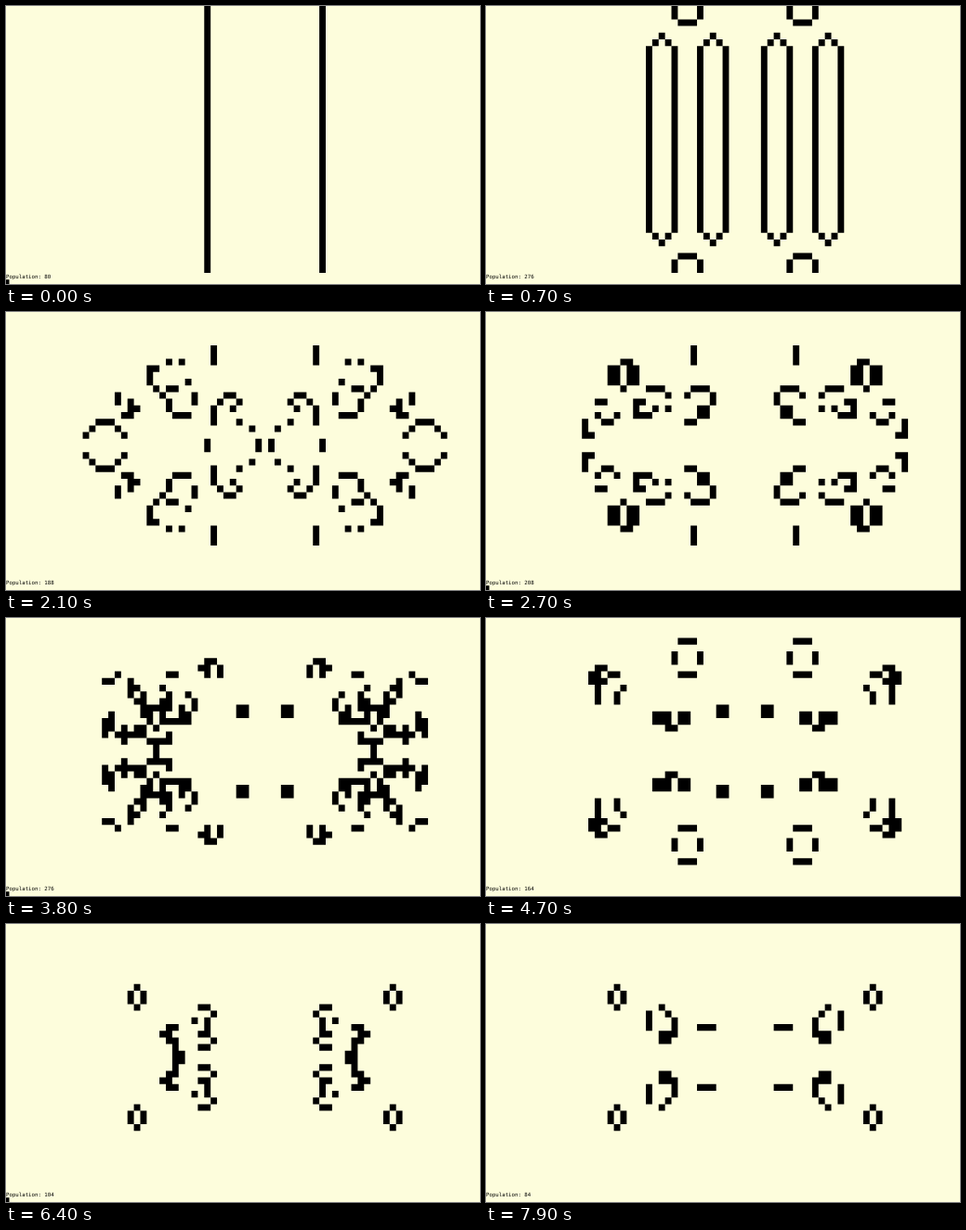
An HTML page with a canvas that plays this animation: 510 px wide and 300 px high, repeating every 8 s.

```html
<!DOCTYPE html>
<html lang="en">
<head>
<meta charset="utf-8">
<title>Game of Life</title>
<style>
  html, body { margin: 0; width: 100%; height: 100%; overflow: hidden; background: #fdfddc; }
  canvas { display: block; width: 510px; height: 300px; }
</style>
</head>
<body>
<canvas id="stage" width="510" height="300"></canvas>
<script>
const COLS = 81, ROWS = 40;
const CELL_W = 6.88, CELL_H = 7.2;
const STEP = 100, LOOP = 8000, BLINK = 1200;
// Ticks on which the simulation lags and keeps its generation.
const LAGS = [6, 42, 60];
const ctx = document.getElementById('stage').getContext('2d');

function seed() {
  const grid = new Uint8Array(COLS * ROWS);
  for (let y = 0; y < ROWS; y++) grid[y * COLS + 31] = grid[y * COLS + 49] = 1;
  return grid;
}

function neighbours(grid, x, y) {
  let n = 0;
  for (let dy = -1; dy <= 1; dy++) {
    for (let dx = -1; dx <= 1; dx++) {
      const cx = x + dx, cy = y + dy;
      if ((dx || dy) && cx >= 0 && cy >= 0 && cx < COLS && cy < ROWS) n += grid[cy * COLS + cx];
    }
  }
  return n;
}

function evolve(grid) {
  return grid.map((alive, i) => {
    const n = neighbours(grid, i % COLS, Math.floor(i / COLS));
    return n === 3 || (alive && n === 2) ? 1 : 0;
  });
}

const ticks = [seed()];
for (let i = 1; i < LOOP / STEP; i++) {
  const last = ticks[i - 1];
  ticks.push(LAGS.includes(i) ? last : evolve(last));
}

function draw(time) {
  const grid = ticks[Math.floor(time / STEP)];
  ctx.fillStyle = '#fdfddc';
  ctx.fillRect(0, 0, 510, 300);
  ctx.fillStyle = '#000';

  // One path for all cells avoids seams between neighbours.
  ctx.beginPath();
  let population = 0;
  grid.forEach((alive, i) => {
    if (!alive) return;
    population++;
    ctx.rect((i % COLS) * CELL_W, Math.floor(i / COLS) * CELL_H, CELL_W, CELL_H);
  });
  ctx.fill();

  ctx.font = '5.72px "DejaVu Sans Mono", monospace';
  ctx.fillText('Population: ' + population, 0, 294.2);
  if (time % BLINK < BLINK / 2) ctx.fillRect(0, 295.2, 3.5, 4.8);
}

const start = performance.now();
function frame() {
  draw((performance.now() - start) % LOOP);
  requestAnimationFrame(frame);
}
draw(0);
requestAnimationFrame(frame);
</script>
</body>
</html>
```
